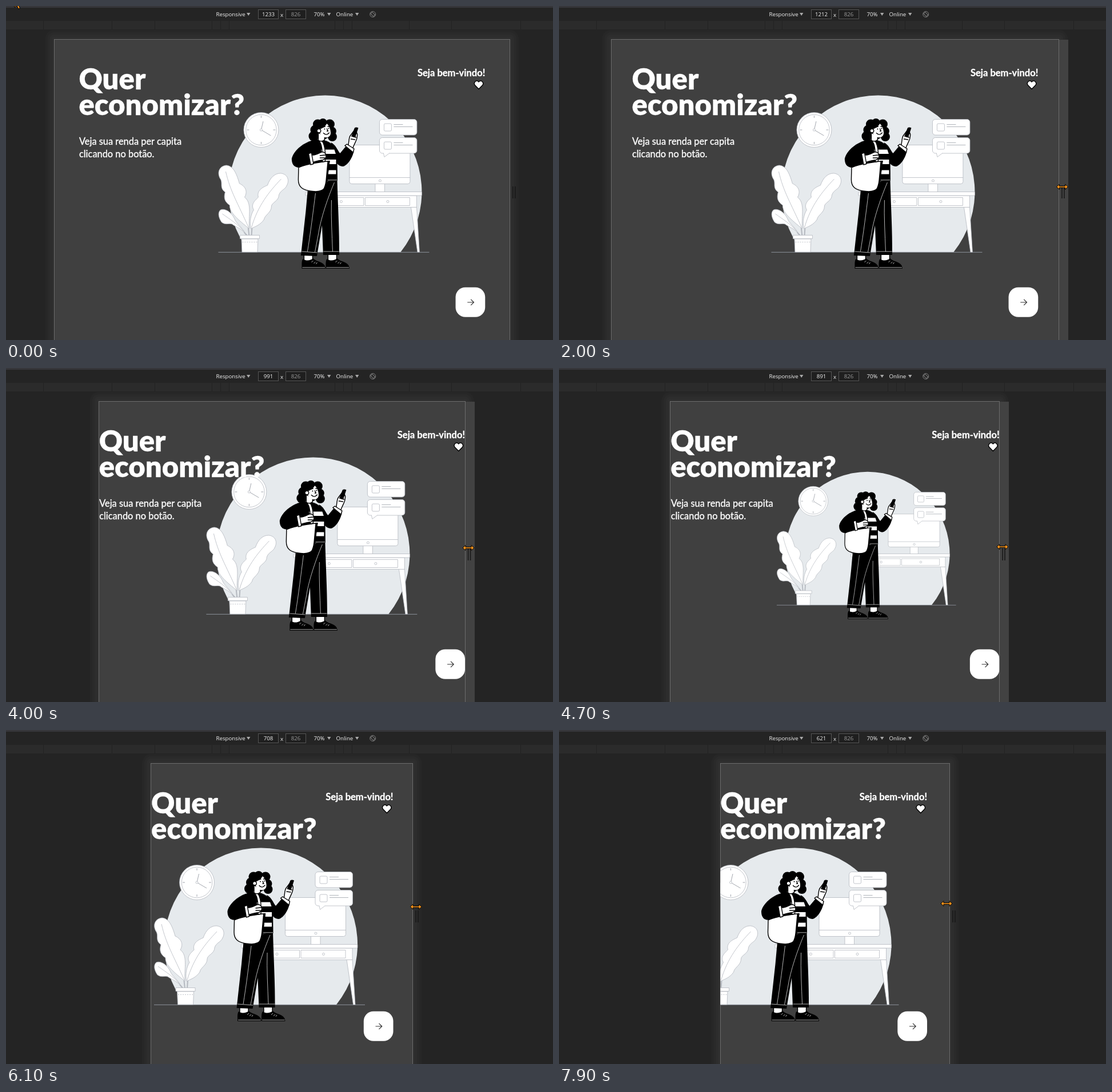
An HTML page for the animation above (8000 ms loop, 957 px wide and 585 px high).

```html
<!DOCTYPE html>
<html lang="pt">
<head>
<meta charset="utf-8">
<style>
html, body { margin: 0; width: 100%; height: 100%; overflow: hidden; background: #242424; }
svg { display: block; }
.bar { font: 9.7px "Open Sans", "Noto Sans", sans-serif; fill: #f2f2f2; }
.mid { text-anchor: middle; }
.lato { font-family: Lato, sans-serif; fill: #fff; stroke: #fff; }
.title { font-size: 50.8px; font-weight: 900; stroke-width: .3; stroke-linejoin: round; }
.lead { font-size: 16.4px; stroke-width: .35; }
.hello { font-size: 16.5px; font-weight: 700; stroke-width: .35; text-anchor: end; }
.soft { fill: #fff; stroke: #b4b8bf; stroke-width: .8; stroke-linejoin: round; }
.ink { fill: #fff; stroke: #000; stroke-width: 1.4; stroke-linejoin: round; stroke-linecap: round; }
.none { fill: none; }
.seam { fill: none; stroke: #fff; stroke-width: .7; }
.orange { fill: #f7941d; stroke: #000; stroke-width: 1; stroke-linejoin: round; }
</style>
</head>
<body>
<svg width="957" height="585" viewBox="0 0 957 585">
  <defs><clipPath id="clip"><rect id="clipBox" y="58" height="530"/></clipPath></defs>

  <!-- toolbar and ruler -->
  <rect width="957" height="585" fill="#242424"/>
  <rect y="26" width="957" height="15" fill="#2b2b2b"/>
  <path stroke="#222" d="M65.5 26v15M185.5 26v15M260.5 26v15M360.5 26v15M375.5 26v15M390.5 26v15M575.5 26v15M590.5 26v15M605.5 26v15M705.5 26v15M779.5 26v15M900.5 26v15"/>
  <rect width="957" height="3" fill="#36363a"/>
  <g class="bar">
    <text x="367.5" y="18">Responsive</text>
    <text x="480" y="18.5">x</text>
    <text x="538.5" y="18">70%</text>
    <text x="577.5" y="18">Online</text>
    <path fill="#aaa" d="M421 12h6.400l-3.200 5zM562 12h6.400l-3.200 5zM611 12h6.400l-3.200 5z"/>
    <g fill="#1f1f1f" stroke="#555"><rect x="441.500" y="6.500" width="35" height="16"/><rect x="489.500" y="6.500" width="35" height="16"/></g>
    <text id="size" class="mid" x="459" y="18"></text>
    <text class="mid" x="507" y="18" fill="#999">826</text>
  </g>
  <g fill="none" stroke="#808080">
    <circle cx="641.700" cy="14.500" r="5"/>
    <rect x="639.700" y="11" width="4" height="7" transform="rotate(-45 641.700 14.500)"/>
  </g>

  <!-- device frame -->
  <g id="glow" fill="#fff" fill-opacity=".012"></g>
  <rect id="strip" y="59" width="16" height="526" fill="#424242"/>
  <path id="grip" stroke="#171717" stroke-width="1.500" d="M0 316v21M4 316v21"/>
  <rect id="page" y="58.500" height="540" fill="#404040" stroke="#6c6c6c"/>

  <g clip-path="url(#clip)">
    <g id="art">
      <path fill="#e6eaed" d="M426 431A169 169 0 1 1 690 431Z"/>
      <path d="M371 431.300H740" stroke="#8c919a"/>

      <g class="soft">
        <circle cx="446" cy="217" r="30.500"/><circle cx="446" cy="217" r="26.800"/>
        <path d="M446 192v4M446 238v4M421 217h4M467 217h4M446 217L449.500 202M446 217L463 227" stroke="#8c919a"/>
        <circle cx="446" cy="217" r="2"/>

        <path class="none" d="M423 385L425 403M430 388L429 403M416 396L422 403" stroke-width="2"/>
        <path d="M425 390C424 365 430 345 417 335C425 321 413 313 408 311C402 290 396 280 385 279C374 280 368 290 374 302C380 310 372 318 383 326C380 336 382 343 391 349C390 362 408 376 425 390Z"/>
        <path d="M428 390C425 378 428 365 433 357C427 347 436 340 441 335C438 324 447 318 457 314C462 300 470 293 480 293C492 294 496 305 491 314C488 322 480 322 477 331C477 342 464 344 464 351C464 362 452 366 451 374C444 384 436 386 428 390Z"/>
        <path d="M418 398C412 387 402 380 400 374C394 360 382 354 375 357C369 362 372 372 377 379C384 384 389 380 395 382C400 386 410 389 418 398Z"/>
        <path class="none" d="M384 290C392 325 405 345 424 388M481 303C460 325 440 350 429 388M378 364C392 374 405 382 416 395"/>
        <path d="M411.500 408H440.500L439.500 431H412.500Z"/><rect x="409" y="401.500" width="34" height="6"/>
        <path class="none" d="M413 413.500h26" stroke-dasharray="2 2"/>

        <rect x="645.500" y="310" width="16.500" height="16"/>
        <rect x="600.500" y="243.500" width="106" height="68" rx="4"/>
        <path d="M600.500 300.500h106"/><circle cx="654" cy="306" r="2"/>
        <path d="M708 352L719.500 431H723L718 352Z"/>
        <rect x="541" y="332" width="177" height="20.500"/>
        <rect x="545" y="335.500" width="80.500" height="14"/><rect x="628" y="335.500" width="78" height="14"/>
        <circle cx="586" cy="342.500" r="2"/><circle cx="667.500" cy="342.500" r="2"/>
        <rect x="523.500" y="325.500" width="203.500" height="6.500" rx="1"/>

        <g id="note">
          <rect x="653" y="198.500" width="65.500" height="27.500" rx="5"/>
          <rect x="661" y="206" width="13" height="13" rx="2"/>
          <path d="M678 207.500h16M678 211.500h33" stroke="#9da2aa"/>
        </g>
        <use href="#note" y="32"/>
        <path d="M660 258L661.500 264.500L670 258"/>
        <path d="M660.500 257.500h9" stroke="#fff" stroke-width="1.500"/>
      </g>

      <!-- woman -->
      <g id="shoe">
        <path class="ink" d="M521 434H536V447H521Z"/>
        <path d="M517 460V451C517 447 518 444 519 443C525 447 532 446 537 442C543 449 558 447 558.500 460Z"/>
        <path class="seam" d="M518 458H557.500" stroke-width="1.800"/>
        <path class="seam" d="M534 449l3-3M538 451l3-3M542 452l2-3"/>
      </g>
      <use href="#shoe" x="42"/>
      <path d="M528 316L579 303C580 345 583 395 582.500 436H554.500L552.500 384L543.500 438L515.500 437L524 360Z"/>
      <path class="seam" d="M541 328C537 360 532 400 527 430M574 309C563 335 550 372 546 400L540 431M569 340C568 370 570 400 571 430M517 430L544 432M555 430H582"/>
      <path d="M534 236C545 232 556 234 564 238C574 244 579 252 579 262L579.500 306L540 308Z"/>
      <path d="M568 239C577 243 580 254 584 258L594 246L608 255C605 268 596 280 589 281C583 281 579 277 577 273Z"/>
      <path fill="#fff" d="M551 251.500H574L576.500 259H552ZM553 269H577V277H553ZM555 287.500H577V294.500H556Z"/>
      <path class="seam" d="M562 304.800H579"/>
      <path class="ink" d="M598 245C600 238 599 231 602 227L608 219C612 220 615 223 614 228C614 235 609 240 606 250Z"/>
      <path class="ink" d="M592.500 244.500L596 242L608.500 250L607 256.500Z"/>
      <path d="M609.500 213.500Q612 211.500 616 213.500L610.500 230.500L603.500 228.500Z"/>
      <path class="ink none" d="M603 233L610 234M606 228l6 2" stroke-width=".9"/>

      <path d="M545 234C524 235 503 252 499.500 267C499 277 504 284 514 282.500L537 278L550 258Z"/>
      <path class="ink" d="M511.500 283C520 278 545 274 565.500 271.500L560.500 310C559 323 548 326 536 324.500C518 323 511 317 511 304Z" stroke-width="1.800"/>
      <path d="M562 272L566 271.500L561 311Q559 319 554 322Q558 315 559 305Z"/>
      <path class="ink" d="M547 236C553 243 553 254 553 273L558 272C559 255 557 242 552 235.500Z"/>
      <path class="ink" d="M534 261C541 262 546 258 551 256C556 255 559 258 559 261C561 265 557 270 551 270C546 271 541 272 536 274Z"/>
      <path class="ink none" d="M549 262L558 261M549 266L557 266" stroke-width=".9"/>
      <path class="ink" d="M529 258.500L534 257L537.500 276.500L532.500 278Z"/>

      <g>
        <circle cx="545" cy="207" r="8.500"/><circle cx="554" cy="204.500" r="7.500"/><circle cx="566" cy="207" r="8.500"/>
        <circle cx="538" cy="228" r="9"/><circle cx="541" cy="217" r="9"/><circle cx="570" cy="219" r="7.500"/>
        <circle cx="570.500" cy="229" r="8"/><circle cx="553" cy="220" r="14"/>
      </g>
      <path class="ink" d="M546 222V235C549 238 555 237 557 234V228Z" stroke-width=".6"/>
      <path fill="#fff" d="M547 216C553 215 558 211 561 206C566 211 568 218 567.500 224C566 231 557 233 550 226Z"/>
      <circle class="ink" cx="547" cy="218.500" r="3.300" stroke-width="1"/>
      <circle cx="557" cy="215.500" r="1"/><circle cx="564" cy="214.500" r="1"/>
      <path class="ink none" d="M555 222.500Q560 228 565 222M561 215l2 4h-2M555 212l3-1M562.500 211l3 0" stroke-width=".9"/>
    </g>

    <g id="left" class="lato">
      <text class="title" x="-.500" y="145.800">Quer</text>
      <text class="title" x="-.500" y="191">economizar?</text>
      <g id="lead" class="lead">
        <text y="243.300">Veja sua renda per capita</text>
        <text y="265.300">clicando no botão.</text>
      </g>
    </g>
    <g id="right">
      <text class="lato hello" y="122.500">Seja bem-vindo!</text>
      <path class="ink" d="M-11.200 145.500L-18 138.500C-21 134 -15 128 -11.200 133C-7.500 128 -1.500 134 -4.400 138.500Z"/>
      <rect x="-51.700" y="492.800" width="51.700" height="51.900" rx="17" fill="#fff"/>
      <path d="M-31 519H-20M-25 513.800L-19.800 519L-25 524.200" fill="none" stroke="#333" stroke-width="1.200"/>
    </g>
  </g>

  <path id="arrow" class="orange" d="M0 0V16L4 12.500L6.500 18.500L9.500 17.300L7 11.500H12Z"/>
  <path id="resize" class="orange" d="M-10 0L-5 -4.500V-1.300H5V-4.500L10 0L5 4.500V1.300H-5V4.500Z"/>
</svg>
<script>
const $ = id => document.getElementById(id);
const set = (el, attrs) => { for (const k in attrs) el.setAttribute(k, attrs[k]); };
const move = (id, x, y = 0) => set($(id), { transform: `translate(${x} ${y})` });
const show = (id, on) => set($(id), { visibility: on ? 'visible' : 'hidden' });

const ZOOM = 0.6464, MID = 482.75, SPREAD = [16, 12, 8, 4];

// viewport width over time
const WIDTH = [[1700, 1233], [2000, 1212], [2200, 1197], [2300, 1197], [2400, 1172], [2500, 1172],
  [3100, 1102], [3400, 1048], [4000, 991], [4300, 968], [5100, 813], [5200, 813], [5600, 770],
  [6100, 708], [6700, 678], [6800, 678], [6900, 674], [7000, 674], [7300, 664], [7400, 664],
  [7700, 640], [7800, 640], [7900, 621]];
// pointer distance from the right edge, and its height
const GRAB_X = [[1700, 8], [2000, 6], [3100, 4], [4000, 6], [5600, 4.5], [6700, 7], [7900, -5.5]];
const GRAB_Y = [[1700, 317], [3100, 316], [4000, 315], [5600, 311], [6700, 308], [7900, 304]];
// picture centre from the left edge, by viewport width
const CENTRE = [[770, 307], [991, 372], [1100, 428.3]];

function at(keys, x) {
  if (x <= keys[0][0]) return keys[0][1];
  for (let i = 1; i < keys.length; i++) {
    const [x0, y0] = keys[i - 1], [x1, y1] = keys[i];
    if (x <= x1) return y0 + (y1 - y0) * (x - x0) / (x1 - x0);
  }
  return keys[keys.length - 1][1];
}

const glows = SPREAD.map(s => {
  const r = document.createElementNS('http://www.w3.org/2000/svg', 'rect');
  set(r, { y: 58 - s, height: 600, rx: s });
  $('glow').append(r);
  return r;
});

function layout(view) {
  const w = view * ZOOM, left = MID - w / 2, edge = left + w;
  const boxW = Math.min(w, 1100 * ZOOM), boxL = MID - boxW / 2 + 0.7;
  const narrow = view <= 768;
  let right = boxL + boxW - 0.7, centre, scale = 1;
  if (narrow) {
    right = left + 0.9 * w + Math.min(11, (view - 621) * 0.19) + 0.7;
    centre = right - 234;
  } else {
    centre = boxL - 0.3 + at(CENTRE, view);
    scale = Math.min(1, (w - 262) / 369);
  }
  const x = Math.floor(left) + 0.5, pageW = Math.round(w);
  set($('page'), { x, width: pageW });
  set($('clipBox'), { x, width: pageW });
  glows.forEach((r, i) => set(r, { x: left - SPREAD[i], width: w + 2 * SPREAD[i] }));
  set($('strip'), { x: x + pageW + 0.5 });
  move('grip', edge + 5.5);
  move('left', boxL);
  move('right', right);
  show('lead', !narrow);
  set($('art'), { transform: `translate(${centre} ${narrow ? 375 : 325}) scale(${scale}) translate(-555.5 -325)` });
  $('size').textContent = Math.round(view);
  return edge;
}

function draw(now) {
  const t = Math.floor(now % 8000 / 100) * 100;
  const edge = layout(at(WIDTH, t));
  const k = Math.min(1, Math.max(0, (t - 100) / 900)), ease = k * k * (3 - 2 * k);
  move('arrow', 15 + 871 * ease, -13.5 + 330.5 * ease);
  move('resize', edge + at(GRAB_X, t), at(GRAB_Y, t));
  show('arrow', t < 1100);
  show('resize', t >= 1100);
  show('strip', t >= 1100 && t < 5300);
}

const start = performance.now();
function tick() {
  draw(performance.now() - start);
  requestAnimationFrame(tick);
}
tick();
</script>
</body>
</html>
```
